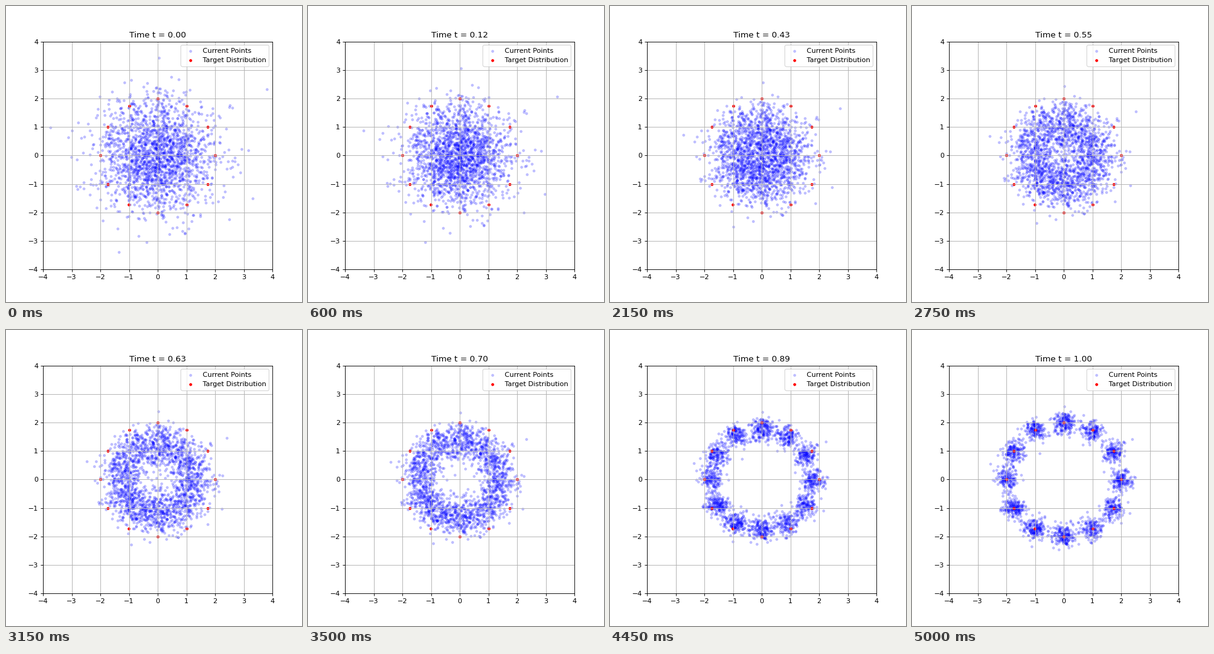
A matplotlib script that plays this animation: 480 px wide and 480 px high, repeating every 5050 ms.

```python
import numpy as np
import matplotlib.pyplot as plt
from matplotlib.animation import FuncAnimation

STEPS = 100
SIGMA = 0.2
COUNT = 2000

angles = np.arange(12) * np.pi / 6
centers = 2 * np.column_stack([np.cos(angles), np.sin(angles)])


def velocity(x, t):
    """Flow that carries a unit normal to the ring of normals on straight paths."""
    var = (1 - t) ** 2 + (t * SIGMA) ** 2
    diff = x[:, None] - t * centers
    logits = -(diff ** 2).sum(axis=2) / (2 * var)
    weights = np.exp(logits - logits.max(axis=1, keepdims=True))
    weights /= weights.sum(axis=1, keepdims=True)
    rate = (t * SIGMA ** 2 - (1 - t)) / var
    return (weights[..., None] * (centers + rate * diff)).sum(axis=1)


def trajectory():
    np.random.seed(0)
    path = [np.random.randn(COUNT, 2)]
    for i in range(STEPS):
        path.append(path[-1] + velocity(path[-1], i / STEPS) / STEPS)
    return path


path = trajectory()

fig, ax = plt.subplots(figsize=(6, 6), dpi=80)
cloud = ax.scatter(*path[0].T, s=10, color="blue", alpha=0.2,
                   label="Current Points")
ax.scatter(*centers.T, s=10, color="red", label="Target Distribution")
ax.set_xlim(-4, 4)
ax.set_ylim(-4, 4)
ax.grid(True)
ax.legend(loc="upper right")
title = ax.set_title("Time t = 0.00")


def update(i):
    cloud.set_offsets(path[i])
    title.set_text(f"Time t = {i / STEPS:.2f}")
    return cloud, title


anim = FuncAnimation(fig, update, frames=STEPS + 1, interval=50,
                     repeat=True, repeat_delay=0)
plt.show()
```
